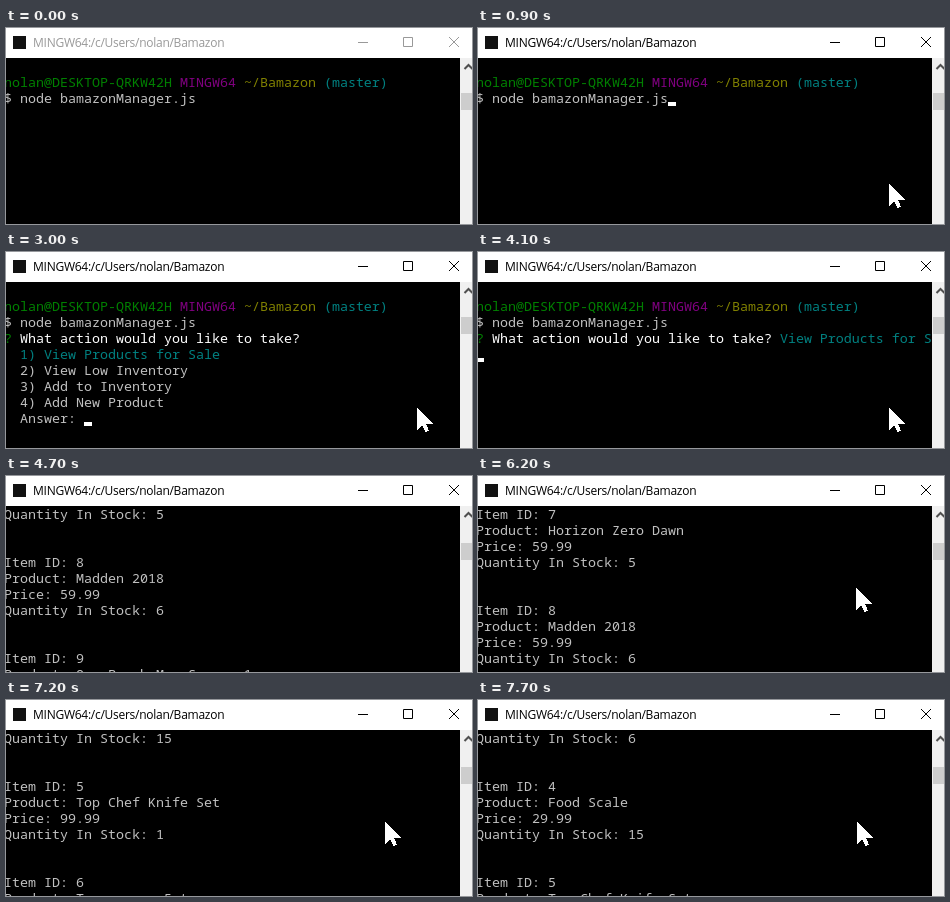
These frames come from a looping animation (466 by 196 pixels, 8 s). An HTML page:

```html
<!DOCTYPE html>
<html lang="en">
<head>
<meta charset="utf-8">
<title>Terminal session</title>
<style>
  html, body { margin: 0; width: 100%; height: 100%; overflow: hidden; background: #000; }
  svg { display: block; width: 466px; height: 196px; }
  #rows text { font: 13.333px "Noto Sans Mono", "DejaVu Sans Mono", monospace; white-space: pre; }
  #title { font: 12px "Open Sans", "Noto Sans", sans-serif; letter-spacing: -0.27px; }
</style>
</head>
<body>
<svg viewBox="0 0 466 196">
  <rect width="466" height="196" fill="#000"/>
  <g id="rows"></g>
  <rect id="caret" width="8" height="4" fill="#fff"/>

  <rect x="454" y="30" width="12" height="166" fill="#f0f0f0"/>
  <path d="M458.5 41L462.5 37L466.5 41" fill="none" stroke="#505050" stroke-width="2"/>
  <rect id="thumb" x="455" width="11" height="17" fill="#cdcdcd"/>

  <rect width="466" height="30" fill="#fff"/>
  <rect x="7" y="8" width="13" height="13" fill="#111"/>
  <text id="title" x="27" y="19">MINGW64:/c/Users/nolan/Bamazon</text>
  <path id="buttons" d="M352 14.5H362M397.5 9.5H406.5V18.5H397.5ZM443 9L453 19M453 9L443 19" fill="none"/>

  <path id="mouse" d="M0 -.6L16 15.4V16H9L12 22.6L8.5 24L5 17.4L0 22Z" fill="#fff" shape-rendering="crispEdges"/>
</svg>
<script>
const LOOP = 8000, CELL = 8, LINE = 16, LEFT = -2, TOP = 30, ROWS = 11;
const GREEN = '#008000', PURPLE = '#800080', OLIVE = '#808000', TEAL = '#008080',
      GREY = '#c0c0c0', WHITE = '#fff';
const $ = id => document.getElementById(id);

// A line is a list of [text, colour] runs.
const plain = s => [[s, GREY]];
const question = [['? ', GREEN], ['What action would you like to take?', WHITE]];
const shell = [
  [],
  [['nolan@DESKTOP-QRKW42H ', GREEN], ['MINGW64 ', PURPLE], ['~/Bamazon ', OLIVE], ['(master)', TEAL]],
  plain('$ node bamazonManager.js')
];
const menu = [
  question,
  [['  1) View Products for Sale', TEAL]],
  ...['  2) View Low Inventory', '  3) Add to Inventory', '  4) Add New Product', '  Answer: '].map(plain)
];
const answered = [[...question, [' View Products for Sale', TEAL]]];

const items = [
  [3, 'Cast Iron Pan', '24.99', 6],
  [4, 'Food Scale', '29.99', 15],
  [5, 'Top Chef Knife Set', '99.99', 1],
  [6, 'Tupperware 5ct', '9.99', 10],
  [7, 'Horizon Zero Dawn', '59.99', 5],
  [8, 'Madden 2018', '59.99', 6],
  [9, 'One Punch Man Season 1', '39.99', 8]
];
const listing = items.flatMap(([id, name, price, count]) =>
  ['Item ID: ' + id, 'Product: ' + name, 'Price: ' + price, 'Quantity In Stock: ' + count, '', ''].map(plain));

// Latest entry whose start time has passed.
const at = (steps, t) => steps.reduce((found, s) => t >= s[0] ? s : found, null);

// [time, first visible line of the listing]
const scroll = [[4200, 25], [4400, 27], [6100, 24], [6300, 21], [6500, 18], [6700, 15],
                [7000, 12], [7200, 9], [7500, 6], [7700, 3]];
// [time, column, row]; no column hides the caret
const carets = [[0], [900, 24, 2], [1400], [2000, 0, 3], [2100, 10, 8], [2500], [3000, 10, 8],
                [3500], [3800, 11, 8], [4100, 0, 4], [4200]];
// [start, end, from x, from y, to x, to y]
const moves = [[0, 500, 427, 200, 411, 156], [5400, 6200, 466, 168, 378, 112], [6500, 6600, 378, 112, 379, 122]];

function screen(t) {
  const view = at(scroll, t);
  if (view) return listing.slice(view[1], view[1] + ROWS);
  if (t >= 4100) return [...shell, ...answered];
  if (t < 2100) return shell;
  const lines = [...shell, ...menu];
  if (t >= 3800) lines[8] = plain('  Answer: 1');
  return lines;
}

function mouseAt(t) {
  if (t < 100 || (t >= 4700 && t < 5500)) return null;
  const [start, end, x0, y0, x1, y1] = at(moves, t);
  const p = Math.min(1, (t - start) / (end - start));
  const k = 1 - (1 - p) ** 2;
  return [Math.round(x0 + (x1 - x0) * k), Math.round(y0 + (y1 - y0) * k)];
}

const rowNodes = Array.from({ length: ROWS }, (_, i) => {
  const node = document.createElementNS('http://www.w3.org/2000/svg', 'text');
  node.setAttribute('x', LEFT);
  node.setAttribute('y', TOP + LINE * i + 13);
  return $('rows').appendChild(node);
});

function place(node, x, y) {
  node.setAttribute('transform', `translate(${x} ${y})`);
}

function show(node, visible) {
  node.setAttribute('visibility', visible ? 'visible' : 'hidden');
}

function draw(t) {
  const lines = screen(t);
  rowNodes.forEach((node, i) => {
    node.innerHTML = (lines[i] || []).map(([s, c]) => `<tspan fill="${c}">${s}</tspan>`).join('');
  });

  const [, col, row] = at(carets, t);
  show($('caret'), col !== undefined);
  if (col !== undefined) place($('caret'), LEFT + CELL * col, TOP + LINE * row + 12);

  const focused = t >= 400;
  $('title').setAttribute('fill', focused ? '#000' : '#999');
  $('buttons').setAttribute('stroke', focused ? '#000' : '#999');
  $('thumb').setAttribute('y', t >= 4200 ? 67 : 65);

  const mouse = mouseAt(t);
  show($('mouse'), mouse);
  if (mouse) place($('mouse'), ...mouse);
}

let last = -1;
function tick() {
  const t = Math.floor(performance.now() % LOOP / 100) * 100;
  if (t !== last) draw(last = t);
  requestAnimationFrame(tick);
}
tick();
</script>
</body>
</html>
```
